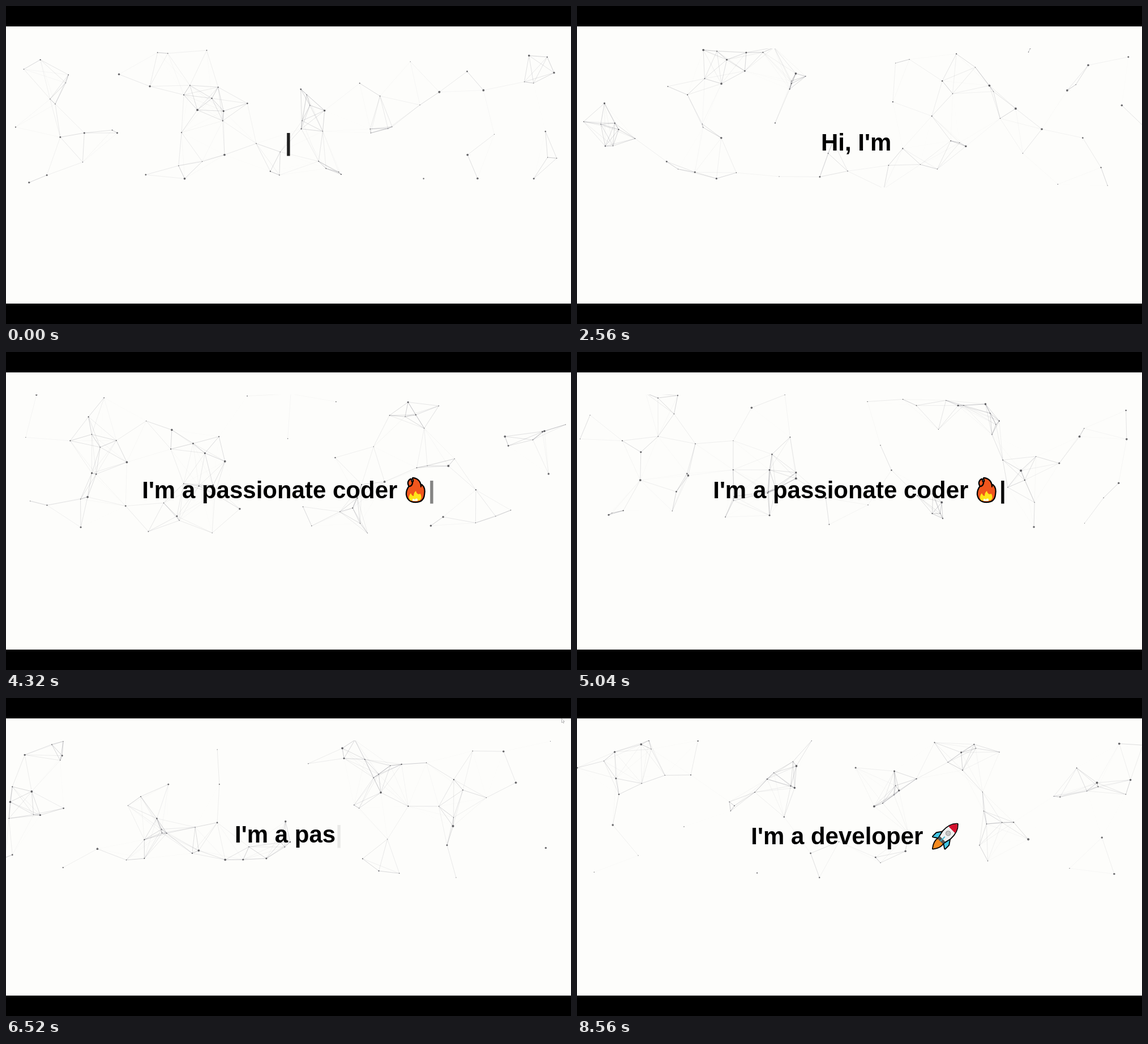
An HTML page with a canvas that plays this animation: 998 by 561 pixels, repeating every 8.6 s.

```html
<!DOCTYPE html>
<html lang="en">
<head>
<meta charset="utf-8">
<title>Typed greeting</title>
<style>
html, body { margin: 0; width: 100%; height: 100%; overflow: hidden; background: #fdfdfb; }
canvas { display: block; }
</style>
</head>
<body>
<canvas id="stage" width="998" height="561"></canvas>
<script>
const W = 998, H = 561, LOOP = 8600;
const TYPE = 52, ERASE = 72;               // ms per character
const NET = { count: 72, top: 75, bottom: 320, reach: 90, speed: 110, pad: 3 };
const ctx = document.getElementById('stage').getContext('2d');

function seeded(seed) {
  return () => {
    seed = (seed * 1664525 + 1013904223) >>> 0;
    return seed / 4294967296;
  };
}
const rand = seeded(29);

const dots = Array.from({ length: NET.count }, () => ({
  x: rand() * W,
  y: NET.top + rand() * (NET.bottom - NET.top),
  vx: (rand() - 0.5) * NET.speed,
  vy: (rand() - 0.5) * NET.speed,
  r: 0.6 + 1.5 * rand() ** 2
}));

const wrap = (v, lo, hi) => lo + ((v - lo) % (hi - lo) + hi - lo) % (hi - lo);

function drawNet(t) {
  const s = t / 1000, { top, bottom, reach, pad } = NET;
  const now = dots.map(d => ({
    x: wrap(d.x + d.vx * s, -pad, W + pad),
    y: wrap(d.y + d.vy * s, top - pad, bottom + pad),
    r: d.r
  }));
  ctx.save();
  ctx.beginPath();
  ctx.rect(0, top, W, bottom - top);
  ctx.clip();
  ctx.lineWidth = 0.7;
  now.forEach((a, i) => {
    for (const b of now.slice(i + 1)) {
      const gap = Math.hypot(a.x - b.x, a.y - b.y);
      if (gap >= reach) continue;
      ctx.strokeStyle = `rgba(45,45,60,${0.42 * (1 - gap / reach)})`;
      ctx.beginPath();
      ctx.moveTo(a.x, a.y);
      ctx.lineTo(b.x, b.y);
      ctx.stroke();
    }
  });
  ctx.fillStyle = 'rgba(30,30,35,.65)';
  for (const d of now) {
    ctx.beginPath();
    ctx.arc(d.x, d.y, d.r, 0, 7);
    ctx.fill();
  }
  ctx.restore();
}

// Icon helpers
function solid(d, color, edge = 0) {
  const path = new Path2D(d);
  if (edge) line(d, '#000', edge * 2);
  ctx.fillStyle = color;
  ctx.fill(path);
}

function line(d, color, width) {
  ctx.strokeStyle = color;
  ctx.lineWidth = width;
  ctx.stroke(new Path2D(d));
}

function disc(x, y, r, color) {
  ctx.fillStyle = color;
  ctx.beginPath();
  ctx.arc(x, y, r, 0, 7);
  ctx.fill();
}

function wave() {
  const swings = 'M21 4Q29 4 33 11M28 2Q36 3 39 9M5 31Q5 42 16 44M4 39Q6 45 13 46';
  line(swings, '#000', 4.6);
  line(swings, '#35b5d0', 2);

  let fingers = 'M39 11L40 30', gaps = '';
  for (let i = 0; i < 4; i++) {
    const x = 33 - 3.4 * i, y = 25 + 4 * i, len = 25 - 2 * (i - 1) ** 2;
    fingers += `M${x} ${y}l${-0.74 * len} ${-0.67 * len}`;
    if (i < 3) gaps += `M${x - 6} ${y - 2}l${-0.5 * len} ${-0.45 * len}`;
  }
  for (const [color, edge] of [['#000', 2.4], ['#fcc43c', 0]]) {
    line(fingers, color, 7 + 2 * edge);
    disc(32, 32, 11.5 + edge, color);
  }
  line(gaps, '#a8701c', 1.2);
}

function fire() {
  solid('M16 3Q29 5 29 19Q32 18 31 15Q37 20 35 31Q34 44 20 44Q7 44 5 31Q5 23 10 17Q5 9 12 5Q12 10 15 11Q19 8 16 3Z',
    '#f0561d', 2.2);
  solid('M11 42Q6 36 12 29Q14 34 17 34Q17 28 21 25Q23 33 29 30Q33 39 27 42Z', '#ffe31a');
  solid('M15 43Q14 37 19 40Q25 36 24 43Z', '#fffbe0');
  line('M10 17Q14 16 15 11', '#000', 2.4);
}

function rocket() {
  ctx.translate(27, 24.5);
  ctx.rotate(Math.PI / 4);
  solid('M-6 11Q-8 20 0 30Q8 20 6 11Z', '#f58a1f', 1.8);
  solid('M-8-4L-15 6V15L-6 9ZM8-4L15 6V15L6 9Z', '#43c6e4', 1.8);
  solid('M0-31Q10-22 9-4L6 9H-6L-9-4Q-10-22 0-31Z', '#eee', 1.8);
  solid('M0-31Q7-25 8-17H-8Q-7-25 0-31Z', '#d3122e');
  solid('M-7 6H7L6 12H-6Z', '#555');
  disc(0, -8, 4.6, '#888');
  disc(0, -8, 3.6, '#c4c4c4');
  line('M0 1V11', '#35b5d0', 1.8);
}

const phrases = [
  { text: "Hi, I'm Kunav ", icon: wave, size: 49, from: 100, erase: 1960 },
  { text: "I'm a passionate coder ", icon: fire, size: 43, from: 3040, erase: 5380 },
  { text: "I'm a developer ", icon: rocket, size: 56, from: 7150, erase: Infinity }
];

function drawLine(t) {
  const p = phrases.findLast(q => t >= q.from) || phrases[0];
  const full = p.text.length + 1;
  const steps = (start, pace) => Math.min(full, Math.max(0, Math.floor((t - start) / pace)));
  const shown = steps(p.from, TYPE) - steps(p.erase, ERASE);
  const text = p.text.slice(0, shown), hasIcon = shown === full;

  ctx.font = 'bold 42px "Liberation Sans", Arial, sans-serif';
  const textWidth = ctx.measureText(text).width;
  const iconWidth = hasIcon ? p.size : 0;
  const x = W / 2 - (textWidth + iconWidth + ctx.measureText('|').width) / 2;
  const base = hasIcon ? 258 : 255;
  ctx.fillStyle = '#000';
  ctx.fillText(text, x, base);

  // The caret fades linearly out and in once a second.
  const phase = ((t + 440) % 1000) / 500;
  ctx.globalAlpha = 1 - Math.abs(1 - phase);
  ctx.fillText('|', x + textWidth + iconWidth, base);
  ctx.globalAlpha = 1;

  if (!hasIcon) return;
  ctx.save();
  ctx.translate(x + textWidth, 220);
  ctx.lineJoin = ctx.lineCap = 'round';
  p.icon();
  ctx.restore();
}

function drawPointer(t) {
  if (t < 5500 || t > 7800) return;
  const fall = Math.max(0, (t - 7500) / 300);
  const arrow = 'M0 0L0 7L1.8 5.6L3 8L4 7.5L3 5L5 5Z';
  ctx.save();
  ctx.translate(981.5, 36.5 + 500 * fall * fall);
  solid(arrow, '#fff');
  line(arrow, '#999', 0.7);
  ctx.restore();
}

function frame() {
  const t = Math.floor(performance.now() % LOOP / 40) * 40;
  ctx.fillStyle = '#fdfdfb';
  ctx.fillRect(0, 0, W, H);
  drawNet(t);
  drawLine(t);
  drawPointer(t);
  ctx.fillStyle = '#000';
  ctx.fillRect(0, 0, W, 36);
  ctx.fillRect(0, 525, W, 36);
  requestAnimationFrame(frame);
}
frame();
</script>
</body>
</html>
```
